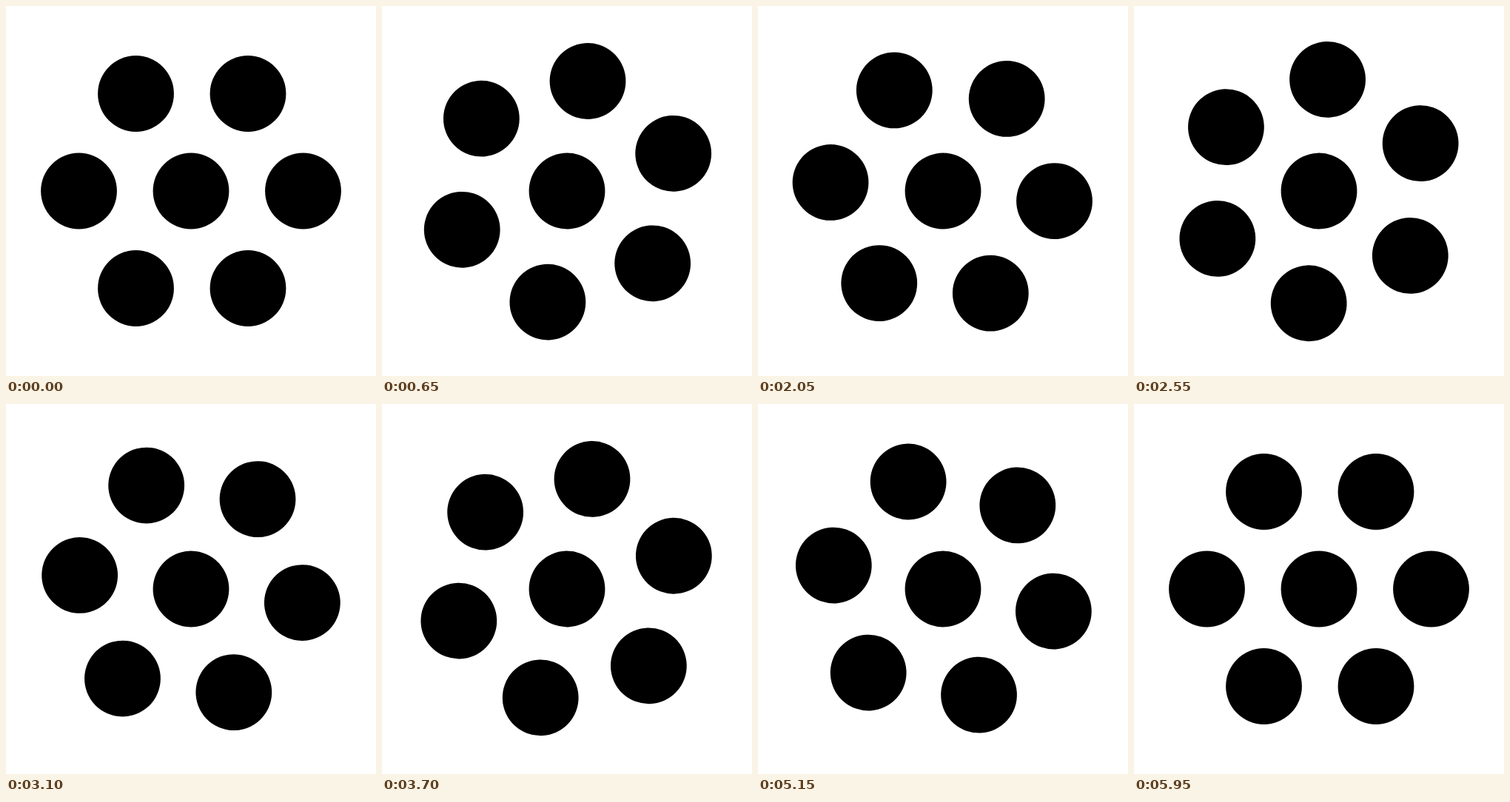
Recreate the animation shown at these times as an HTML page with a canvas. Size 500 by 500 pixels, loop 6000 ms.

```html
<!DOCTYPE html>
<html>
<head>
<meta charset="utf-8">
<style>
html, body { margin: 0; width: 100%; height: 100%; overflow: hidden; background: #fff; }
canvas { display: block; width: 500px; height: 500px; }
</style>
</head>
<body>
<canvas id="stage" width="500" height="500"></canvas>
<script>
const ctx = document.getElementById('stage').getContext('2d');
const LOOP = 6000, STEP = 50, RADIUS = 51.4;
const DOTS = [
  [0, 0], [-151.5, 0], [151.5, 0],
  [-74.5, -131.5], [77, -131.5],
  [-74.5, 131.5], [77, 131.5]
];

// One turn in 179 ticks; each 50 ms step advances by 2 or 1 ticks in turn.
function turnAt(ms) {
  const step = Math.floor((ms % LOOP) / STEP);
  return Math.ceil(step * 1.5) / 179 * Math.PI * 2;
}

function draw(ms) {
  ctx.setTransform(1, 0, 0, 1, 0, 0);
  ctx.fillStyle = '#fff';
  ctx.fillRect(0, 0, 500, 500);
  ctx.translate(250, 250);
  ctx.rotate(turnAt(ms));
  ctx.fillStyle = '#000';
  for (const [x, y] of DOTS) {
    ctx.beginPath();
    ctx.arc(x, y, RADIUS, 0, Math.PI * 2);
    ctx.fill();
  }
}

const start = performance.now();
function tick() {
  draw(Math.max(0, performance.now() - start));
  requestAnimationFrame(tick);
}
draw(0);
requestAnimationFrame(tick);
</script>
</body>
</html>
```
